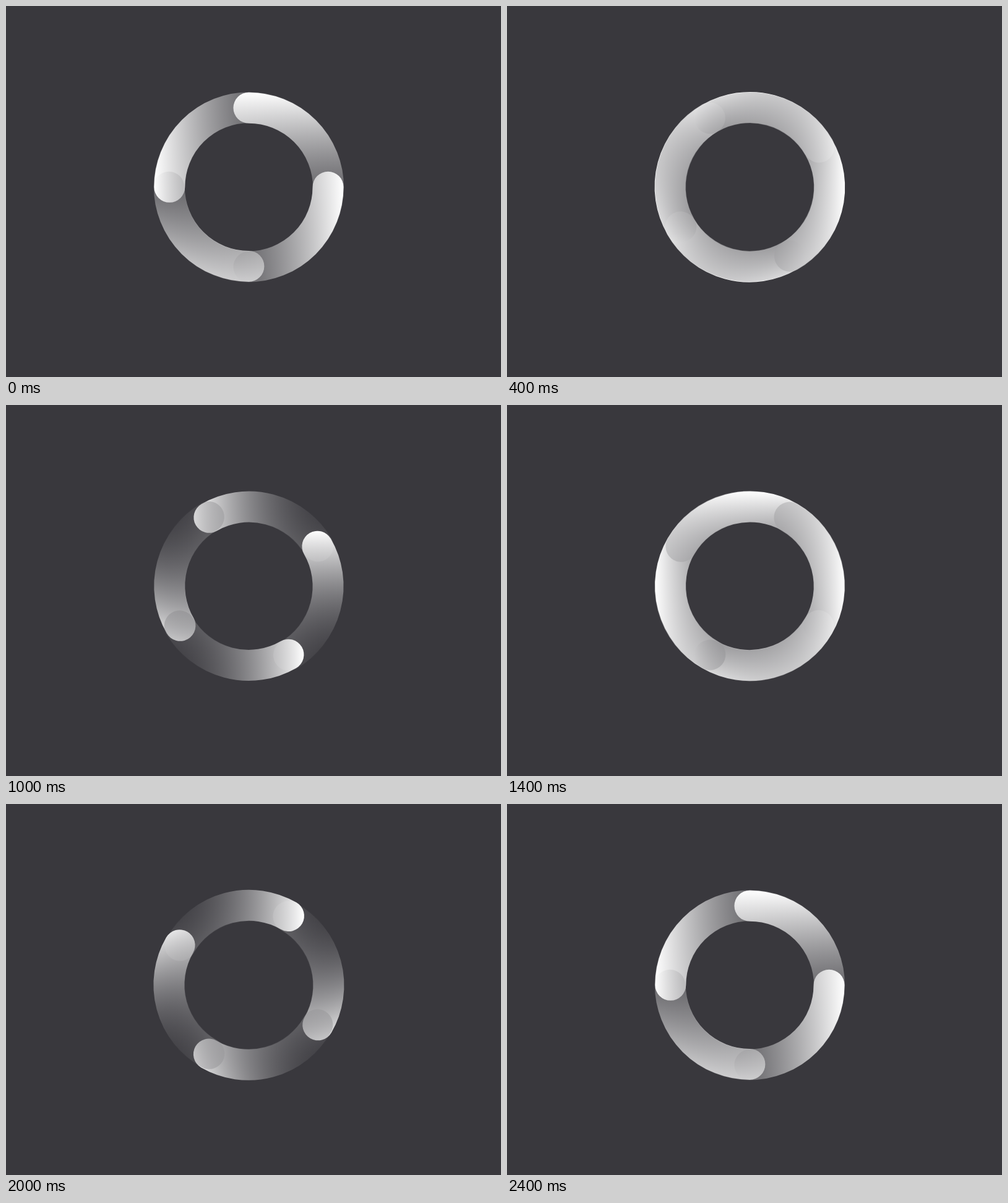
These frames come from a looping animation (800x600 px, 2600 ms). An HTML page with a canvas:

```html
<!DOCTYPE html>
<html lang="en">
<head>
<meta charset="utf-8">
<title>Ring loader</title>
<style>
  html, body { margin: 0; width: 100%; height: 100%; overflow: hidden; background: #39383d; }
  canvas { display: block; }
</style>
</head>
<body>
<canvas id="stage" width="800" height="600"></canvas>
<script>
const ctx = document.getElementById('stage').getContext('2d');
const LOOP = 2600, STEP = 100, LAST = 24;
const CX = 392.4, CY = 292.8, RADIUS = 128.6, WIDTH = 50, WOBBLE = 0.5;

// Half rings, back to front: start angle and the side the light comes from.
const arcs = [
  { start: 90, light: 90 },
  { start: 180, light: 180 },
  { start: 270, light: 270 },
  { start: 0, light: 0 }
];

const rad = deg => deg * Math.PI / 180;

// Furthest reach of a half ring towards a direction, round caps included.
function reach(start, dir) {
  const turn = (((dir - start) % 360) + 360) % 360;
  const peak = turn <= 180 ? 1 : Math.abs(Math.cos(rad(turn)));
  return peak * RADIUS + WIDTH / 2;
}

function drawArc({ start, light }, spin) {
  const from = start + spin;
  const x = CX + WOBBLE * Math.cos(rad(from + 180));
  const y = CY + WOBBLE * Math.sin(rad(from + 180));
  const ux = Math.cos(rad(light)), uy = Math.sin(rad(light));
  const near = reach(from, light), far = reach(from, light + 180);
  const fade = ctx.createLinearGradient(
    x + ux * near, y + uy * near, x - ux * far, y - uy * far);
  fade.addColorStop(0, 'rgba(255,255,255,1)');
  fade.addColorStop(1, 'rgba(57,56,61,0)');
  ctx.strokeStyle = fade;
  ctx.beginPath();
  ctx.arc(x, y, RADIUS, rad(from), rad(from + 180));
  ctx.stroke();
}

function draw(step) {
  ctx.fillStyle = '#39383d';
  ctx.fillRect(0, 0, 800, 600);
  ctx.lineWidth = WIDTH;
  ctx.lineCap = 'round';
  const spin = -30 * (step % 12);
  arcs.forEach(arc => drawArc(arc, spin));
}

const begin = performance.now();
function tick() {
  const time = (performance.now() - begin) % LOOP;
  draw(Math.min(LAST, Math.floor(time / STEP)));
  requestAnimationFrame(tick);
}
tick();
</script>
</body>
</html>
```
